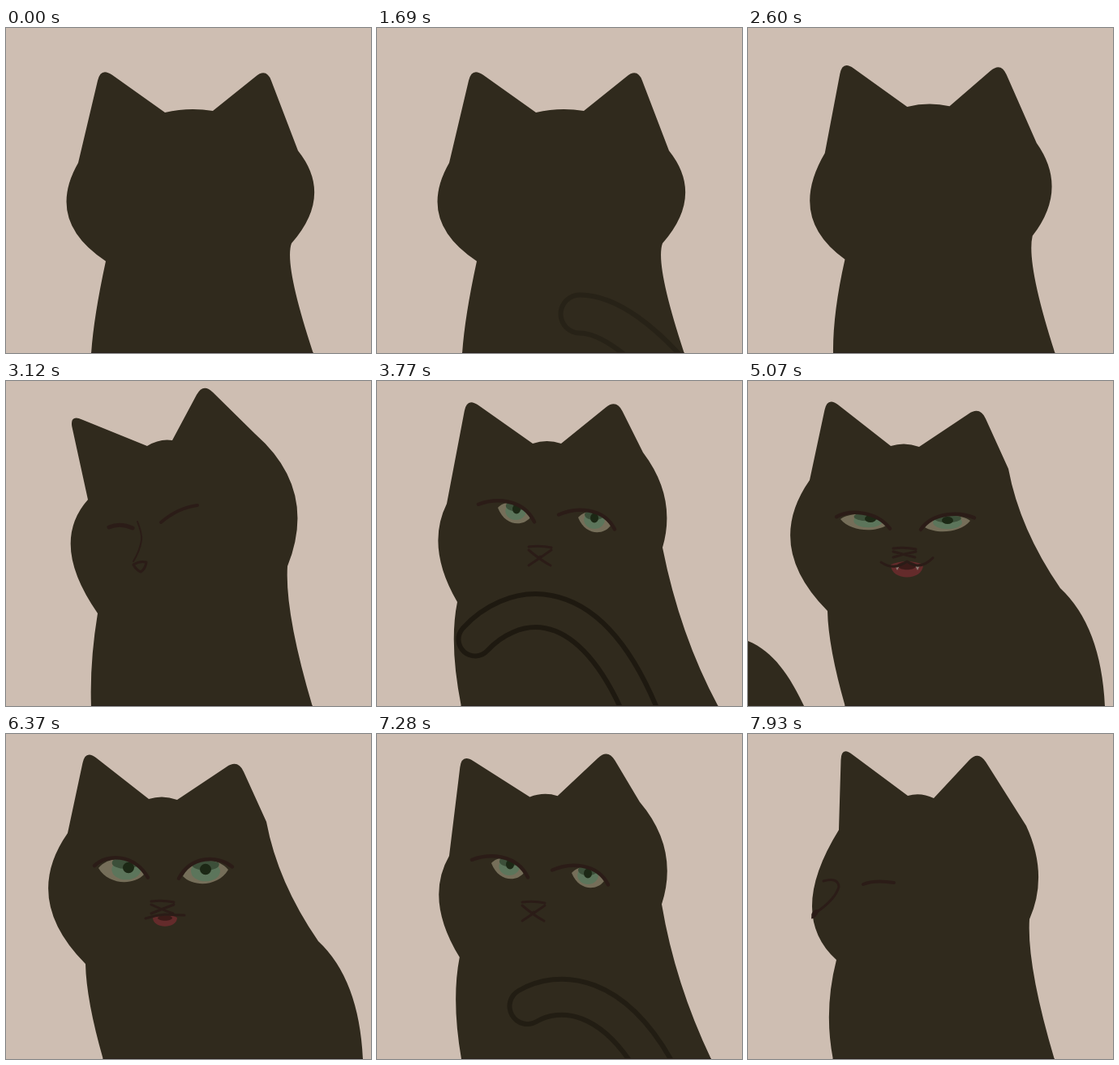
These frames come from a looping animation (450x400 px, 8 s). An HTML page:

```html
<!DOCTYPE html>
<html lang="en">
<head>
<meta charset="utf-8">
<title>Cat</title>
<style>
html, body { margin: 0; width: 100%; height: 100%; overflow: hidden; background: #cebeb2; }
svg { display: block; width: 100%; height: 100%; }
path { stroke-linecap: round; stroke-linejoin: round; }
.line { fill: none; stroke: #2b1c17; }
.fur { fill: #302a1d; }
.tail { fill: none; stroke: #302a1d; }
</style>
</head>
<body>
<svg viewBox="0 0 450 400">
  <defs>
    <clipPath id="inBody"><path id="bodyClip"/></clipPath>
    <clipPath id="inEyes"><path id="eyeClip"/></clipPath>
  </defs>
  <rect width="450" height="400" fill="#cebeb2"/>
  <path id="sideTail" class="fur" d="M-60 310Q-20 312 0 320C32 333 52 364 70 402V520H-60Z"/>
  <path id="body" class="fur"/>
  <path id="tail" class="tail"/>
  <g clip-path="url(#inBody)">
    <path id="tailEdge" fill="none" stroke="#1e1910"/>
    <path id="tailCore" class="tail"/>
    <path d="M0 399.5H450" stroke="#29201a" fill="none"/>
  </g>
  <g id="profile" class="line" stroke-width="3">
    <path d="M142 185Q156 179 180 183" stroke-width="4"/>
    <path d="M93 181Q111 176 112 188Q108 203 85 219"/>
    <path d="M79 221Q82 215 87 217Q85 225 79 227Z" fill="#2b1c17" stroke-width="1"/>
  </g>
  <g id="bow" class="line" stroke-width="3">
    <path d="M127 180Q141 174 156 181" stroke-width="5"/>
    <path d="M191 174Q212 156 236 153" stroke-width="4"/>
    <path d="M162 173Q168 188 167 196Q165 209 157 222" stroke-width="2"/>
    <path d="M157 226Q165 221 173 223Q172 231 166 235Q160 232 157 226Z"/>
  </g>
  <g id="front">
    <path id="balls" fill="#756e59"/>
    <g clip-path="url(#inEyes)">
      <path id="irises" fill="#5c755b"/>
      <path id="shades" fill="#3c4f39"/>
      <path id="pupils" fill="#1c2815"/>
    </g>
    <path id="lids" class="line" stroke-width="4.5"/>
    <path id="tongue" fill="#642b2b"/>
    <path id="throat" fill="#3b1b18"/>
    <path id="fangs" fill="#8f7c74"/>
    <path id="nose" class="line" stroke-width="3"/>
    <path id="smile" class="line" stroke-width="3"/>
  </g>
</svg>
<script>
const STEP = 130, LOOP = 8000;
const $ = id => document.getElementById(id);

// Blend numbers, or arrays and objects of numbers.
function mix(a, b, t) {
  if (typeof a === 'number') return a + (b - a) * t;
  if (Array.isArray(a)) return a.map((v, i) => mix(v, b[i], t));
  return Object.fromEntries(Object.keys(a).map(k => [k, mix(a[k], b[k], t)]));
}

// Value of a key list [[step, value], ...] at step k.
function track(keys, k) {
  const i = keys.findIndex(([step]) => k <= step);
  if (i < 0) return keys[keys.length - 1][1];
  if (i === 0) return keys[0][1];
  const [[k0, a], [k1, b]] = [keys[i - 1], keys[i]];
  return mix(a, b, (k - k0) / (k1 - k0));
}

// Parabola from a to b that passes v halfway.
const arc = (a, v, b) => `Q${v.map((n, i) => 2 * n - (a[i] + b[i]) / 2)} ${b}`;

// Straight ear edges from a over the tip to b, with a rounded tip.
function ear(a, tip, b, round = 17) {
  const toward = p => mix(tip, p, round / Math.hypot(p[0] - tip[0], p[1] - tip[1]));
  return `L${toward(a)}Q${tip} ${toward(b)}L${b}`;
}

function silhouette({ left, ears, right }) {
  const [footL, hipL, neckL, cheekL, baseL] = left;
  const [tipL, innerL, innerR, tipR] = ears;
  const [baseR, cheekR, neckR, hipR, footR] = right;
  const [x, y] = mix(innerL, innerR, .5);
  return `M${footL}` + arc(footL, hipL, neckL) + arc(neckL, cheekL, baseL) +
    ear(baseL, tipL, innerL) + arc(innerL, [x, y - 3], innerR) + ear(innerR, tipR, baseR) +
    arc(baseR, cheekR, neckR) + arc(neckR, hipR, footR) + 'Z';
}

// Each pose: foot, hip, neck, cheek and ear base on the left; ears; mirrored order on the right.
const BACK = {
  left: [[105, 401], [111, 350], [123, 287], [77, 232], [89, 166]],
  ears: [[117, 48], [196, 104], [255, 102], [321, 49]],
  right: [[360, 151], [380, 207], [352, 265], [354, 312], [379, 401]]
};
const PROFILE = {
  left: [[105, 401], [100, 340], [109, 278], [79, 210], [112, 118]],
  ears: [[115, 15], [197, 76], [229, 79], [284, 20]],
  right: [[343, 113], [358, 172], [347, 228], [353, 300], [378, 401]]
};
const BOW = {
  left: [[105, 401], [106, 345], [113, 286], [80, 208], [101, 146]],
  ears: [[78, 41], [174, 80], [205, 73], [243, 2]],
  right: [[307, 65], [356, 140], [347, 228], [353, 300], [378, 401]]
};
const FRONT = {
  left: [[104, 401], [95, 330], [99, 272], [76, 208], [86, 151]],
  ears: [[111, 20], [192, 77], [227, 77], [295, 22]],
  right: [[328, 88], [355, 145], [352, 205], [380, 308], [421, 401]]
};
const SIDE = {
  left: [[120, 401], [104, 335], [98, 283], [53, 203], [76, 122]],
  ears: [[98, 19], [176, 80], [211, 81], [286, 31]],
  right: [[321, 108], [344, 182], [385, 255], [424, 315], [440, 401]]
};
const bodyKeys = [[19, BACK], [23, PROFILE], [24, BOW], [29, FRONT], [33, SIDE]];

// The tail is a thick stroke along one cubic, from tip to root.
const tailPose = (width, ink, ...spine) => ({ width, ink, spine });
const LOW = tailPose(44, .4, 488, 425, 486, 455, 470, 505, 425, 545);
const OUT = tailPose(44, .4, 438, 320, 436, 350, 420, 400, 375, 440);
const CROSS = tailPose(47, .45, 250, 352, 285, 352, 330, 385, 375, 440);
const CURL = tailPose(41, 1, 121, 318, 160, 275, 255, 240, 326, 410);
const LEFT = tailPose(41, 1, 52, 350, 100, 335, 180, 350, 230, 440);
const DROP = tailPose(41, 1, 52, 450, 100, 435, 180, 450, 230, 540);
const tailKeys = [[3, LOW], [5, OUT], [6, CROSS], [9, mix(CROSS, CURL, .65)], [10, LOW],
  [24, LOW], [26, OUT], [27, CROSS], [29, CURL], [31, LEFT], [33, DROP]];
const sideTailKeys = [[35, [-45, 95]], [39, [0, 0]], [41, [10, -12]]];

// Eyes are [x, y, tilt]; the other values are sizes and offsets of the features.
const LOOK = {
  eyeL: [169, 162, 6], eyeR: [268, 173, 5], rx: 20, up: 12, down: 13, gaze: 3, lead: 24,
  nose: [201, 204], drop: 23, mouth: [201, 216], smile: 0, corner: 0, sag: 0,
  open: 0, depth: 0, fang: 0
};
const WIDE = {
  eyeL: [142, 169, 4], eyeR: [246, 171, -4], rx: 28, up: 15, down: 13, gaze: 9, lead: 5,
  nose: [193, 206], drop: 15, mouth: [196, 222], smile: 24, corner: 5, sag: 1,
  open: 15, depth: 14, fang: 0
};
const GRIN = {
  ...WIDE, eyeL: [142, 174, 4], eyeR: [246, 176, -4], up: 10, down: 9,
  drop: 11, smile: 32, corner: 1, sag: 12, open: 20, depth: 19, fang: 6
};
const faceKeys = [[29, LOOK], [33, WIDE], [35, WIDE], [39, GRIN], [41, mix(WIDE, GRIN, 1.3)]];

const ellipse = (x, y, rx, ry) =>
  `M${x - rx} ${y}a${rx} ${ry} 0 1 0 ${2 * rx} 0a${rx} ${ry} 0 1 0 ${-2 * rx} 0Z`;

function eye([x, y, tilt], gaze, f) {
  const { rx, up, down, lead } = f, tall = up + down, bend = rx * .55;
  const top = y - up * 1.33, low = y + down * 1.33;
  return {
    balls: `M${x - rx} ${y - tilt}C${x - bend} ${top} ${x + bend} ${top} ${x + rx} ${y + tilt}` +
      `C${x + bend} ${low} ${x - bend} ${low} ${x - rx} ${y - tilt}Z`,
    irises: ellipse(x + gaze * .7, y - 2, rx * .64, tall * .44),
    shades: ellipse(x + gaze * .6, y - up * .7, rx * .6, tall * .27),
    pupils: ellipse(x + gaze, y - 4.5, rx * .25, tall * .24),
    lids: `M${x - rx - lead} ${y - tilt * 1.7}` +
      `C${x - bend - lead / 2} ${top - 2} ${x + bend} ${top - 2} ${x + rx + 5} ${y + tilt * 1.9}`
  };
}

function mouth({ mouth: [x, y], smile, corner, sag, open, depth, fang }) {
  const bowl = (w, h) => `M${x - w} ${y + 4}Q${x} ${y - 4} ${x + w} ${y + 4}` +
    `C${x + w} ${y + h * 1.3} ${x - w} ${y + h * 1.3} ${x - w} ${y + 4}Z`;
  const tooth = cx => `M${cx - fang / 2} ${y + 5}h${fang}l${-fang / 2} ${fang}Z`;
  return {
    tongue: bowl(open, depth),
    throat: bowl(open * .6, depth * .5),
    fangs: tooth(x - open * .6) + tooth(x + open * .65),
    smile: `M${x - smile} ${y + corner}Q${x - smile / 2} ${y + sag} ${x} ${y}` +
      `Q${x + smile / 2} ${y + sag} ${x + smile} ${y + corner - smile / 6}`
  };
}

const nose = ({ nose: [x, y], drop }) =>
  `M${x - 14} ${y}Q${x} ${y - 2} ${x + 14} ${y + 1}` +
  `M${x - 14} ${y + 4}Q${x} ${y + drop * .7} ${x + 13} ${y + drop}` +
  `M${x + 14} ${y + 4}Q${x} ${y + drop * .6} ${x - 14} ${y + drop}`;

const shape = (id, d) => $(id).setAttribute('d', d);
const show = (id, on) => $(id).setAttribute('display', on ? 'inline' : 'none');
const move = (id, x, y) => $(id).setAttribute('transform', `translate(${x} ${y})`);

function drawFace(f) {
  const l = eye(f.eyeL, f.gaze, f), r = eye(f.eyeR, 0, f);
  for (const id in l) shape(id, l[id] + r[id]);
  shape('eyeClip', l.balls + r.balls);
  const m = mouth(f);
  for (const id in m) shape(id, m[id]);
  shape('nose', nose(f));
}

function drawTail({ width, ink, spine: [x, y, ...rest] }) {
  const parts = { tail: width + 6, tailEdge: width + 6, tailCore: width - 6 };
  for (const id in parts) {
    shape(id, `M${x} ${y}C${rest}`);
    $(id).setAttribute('stroke-width', parts[id]);
  }
  $('tailEdge').setAttribute('opacity', ink);
}

function draw(k) {
  const body = silhouette(track(bodyKeys, k));
  shape('body', body);
  shape('bodyClip', body);
  drawTail(track(tailKeys, k));
  move('sideTail', ...track(sideTailKeys, k));
  drawFace(track(faceKeys, k));

  show('profile', k === 23);
  show('bow', k >= 24 && k <= 26);
  move('bow', (k - 24) * 7, (24 - k) * 3);
  show('front', k >= 27);
  const turn = Math.max(0, 29 - k);
  move('front', -8 * turn, 3 * turn);
}

// Both movements run forwards, then back through the same poses.
function poseAt(ms) {
  const k = Math.floor(ms / STEP);
  return k < 20 ? Math.min(k, 19 - k) : Math.min(k, 84 - k, 41);
}

let start, last;
function tick(now) {
  start ??= now;
  const k = poseAt((now - start) % LOOP);
  if (k !== last) draw(last = k);
  requestAnimationFrame(tick);
}
draw(0);
requestAnimationFrame(tick);
</script>
</body>
</html>
```
